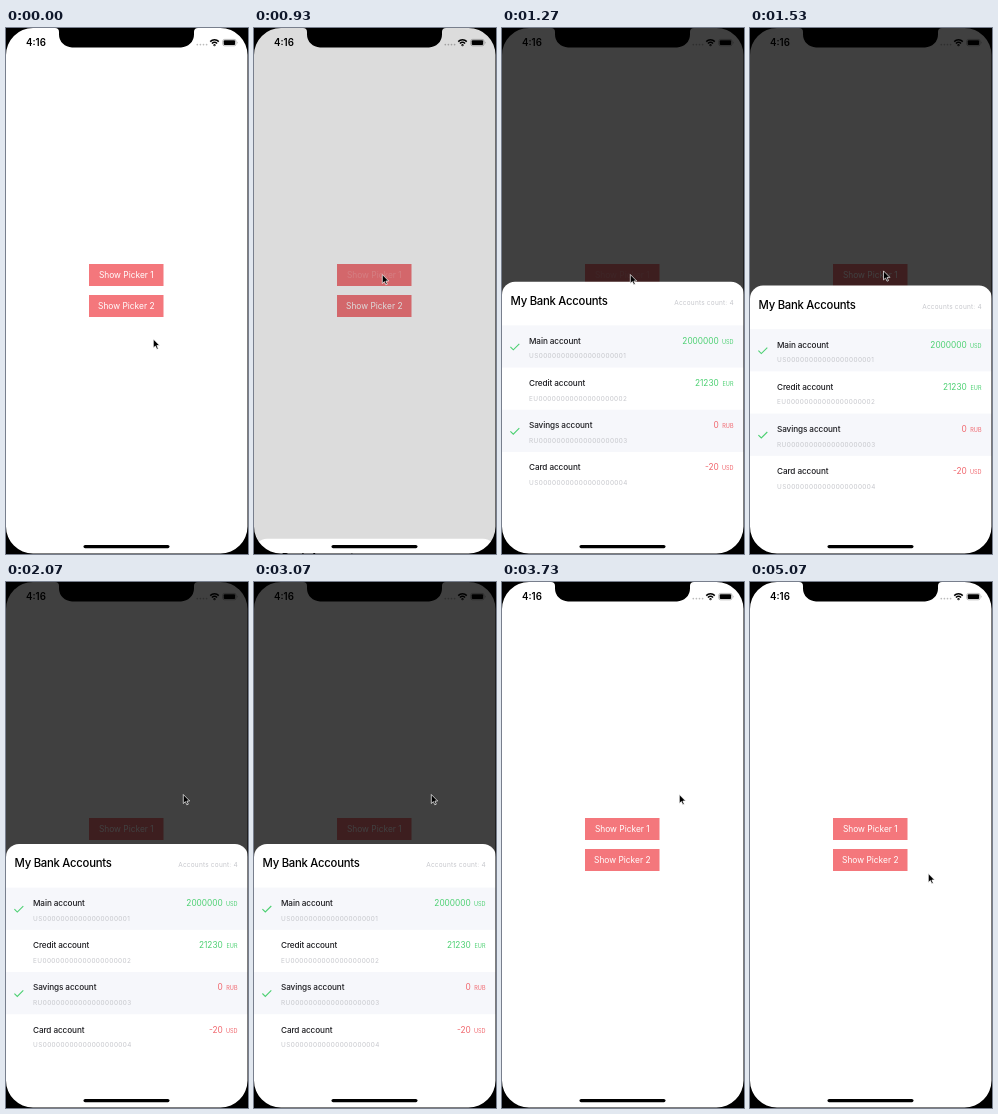
An HTML page that plays this animation: 242x526 px, repeating every 5.19 s.

```html
<!DOCTYPE html>
<html lang="en">
<head>
<meta charset="utf-8">
<title>Bottom sheet picker</title>
<style>
  html, body { margin: 0; height: 100%; overflow: hidden; background: #000; }
  svg { display: block; width: 100vw; height: 100vh; font-family: Inter, Roboto, sans-serif; }
  .button { fill: #f4777c; }
  .label { fill: #fff; font-size: 8.4px; text-anchor: middle; }
  .title { font-size: 11.3px; font-weight: 500; letter-spacing: -.25px; }
  .name { font-size: 8.2px; font-weight: 500; letter-spacing: -.1px; fill: #1c1c20; }
  .faint { fill: #c6c7cc; }
  .count { font-size: 6.5px; letter-spacing: .2px; }
  .iban { font-size: 6.4px; letter-spacing: .42px; }
  .amount { font-size: 8.3px; }
  .currency { font-size: 5.5px; }
  .end { text-anchor: end; }
</style>
</head>
<body>
<svg viewBox="0 0 242 526">
  <rect width="242" height="526" fill="#fff"/>
  <g id="buttons"></g>

  <g id="status">
    <text x="20" y="18" font-size="9.7" font-weight="600">4:16</text>
    <path d="M191.3 16.6h10" stroke="#bbb" stroke-width="1.7" stroke-linecap="round" stroke-dasharray="0 3.1"/>
    <g fill="none" stroke="#000" stroke-width="1.5">
      <path d="M204.2 13.6a6.2 6.2 0 0 1 8.6 0M205.9 15.5a3.8 3.8 0 0 1 5.2 0"/>
      <circle cx="208.5" cy="17.2" r=".4"/>
    </g>
    <rect x="216.8" y="11.4" width="13.2" height="6.4" rx="1.8" fill="none" stroke="#888" stroke-width=".6"/>
    <rect x="217.7" y="12.3" width="11.4" height="4.6" rx="1"/>
    <path d="M231 13.4q1 1.2 0 2.4z" fill="#888"/>
  </g>

  <rect id="dim" width="242" height="526"/>
  <g id="sheet">
    <rect width="242" height="400" rx="13" fill="#fff"/>
    <text class="title" x="8.5" y="23.2">My Bank Accounts</text>
    <text class="faint count end" x="231.8" y="23">Accounts count: 4</text>
    <g id="rows"></g>
  </g>

  <rect x="77.5" y="517" width="86" height="3.2" rx="1.6"/>
  <path fill-rule="evenodd" d="M0 0H242V526H0ZM27 0H214.5A27 27 0 0 1 241.5 27V498.5A27 27 0 0 1 214.5 525.5H27A27 27 0 0 1 0 498.5V27A27 27 0 0 1 27 0Z"/>
  <path d="M49 0Q53 0 53 4V6.4A13 13 0 0 0 66 19.4H175A13 13 0 0 0 188 6.4V4Q188 0 192 0Z"/>
  <path id="cursor" d="M0 0V9l2.1-1.9 1.4 3.2 1.5-.6-1.4-3.2h2.8z" stroke="#fff" stroke-width=".7"/>
</svg>

<script>
const $ = id => document.getElementById(id);
const LOOP = 5190, FRAME = 1000 / 15;
const REST = 262, TRAVEL = 264, DIM = 0.75;
const GREEN = '#4bd071', RED = '#f0646b';

$('buttons').innerHTML = [1, 2].map(n => {
  const y = 205 + 31 * n;
  return `<rect class="button" x="83" y="${y}" width="74.5" height="22"/>
    <text class="label" id="label${n}" x="120.3" y="${y + 14}">Show Picker ${n}</text>`;
}).join('');

const accounts = [
  ['Main', 'US', '2000000', 'USD', GREEN, true],
  ['Credit', 'EU', '21230', 'EUR', GREEN, false],
  ['Savings', 'RU', '0', 'RUB', RED, true],
  ['Card', 'US', '-20', 'USD', RED, false],
];
$('rows').innerHTML = accounts.map(([name, country, amount, currency, color, checked], i) => `
  <g transform="translate(0 ${43.6 + 42.2 * i})">
    ${checked ? `<rect width="242" height="42.2" fill="#f6f7fb"/>
      <path d="M8.4 21.5l2.9 2.9 6-6" fill="none" stroke="${GREEN}" stroke-width="1.1"/>` : ''}
    <text class="name" x="27" y="18.4">${name} account</text>
    <text class="faint iban" x="27" y="33">${country}${String(i + 1).padStart(20, '0')}</text>
    <g class="end" fill="${color}">
      <text class="amount" x="216.8" y="18.4">${amount}</text>
      <text class="currency" x="231.5" y="18.4">${currency}</text>
    </g>
  </g>`).join('');

const progress = (t, from, to) => Math.min(1, Math.max(0, (t - from) / (to - from)));
const smooth = p => p * p * (3 - 2 * p);

// Underdamped spring going from 1 to 0
function spring(ms) {
  const s = Math.max(0, ms) / 1000, w = 7, damping = 6.65;
  return Math.exp(-damping * s) * (Math.cos(w * s) + damping / w * Math.sin(w * s));
}

// start, end, dx, dy, sideways bulge
const moves = [
  [0, 480, -19, -64.5, 0],
  [1400, 2060, 49, -34, 0],
  [3870, 4530, 1, 79, 8],
];
function cursorAt(t) {
  let x = 147.3, y = 311;
  for (const [from, to, dx, dy, bulge] of moves) {
    const p = smooth(progress(t, from, to));
    x += dx * p + bulge * 4 * p * (1 - p);
    y += dy * p;
  }
  return [x, y];
}

function draw(t) {
  const gone = progress(t, 3552, 3730);
  const top = REST + TRAVEL * (spring(t - 895) + gone);
  $('sheet').setAttribute('transform', `translate(0 ${top})`);
  $('sheet').setAttribute('opacity', 1 - gone);
  $('dim').setAttribute('opacity', DIM * progress(t, 870, 1220) * (1 - gone));
  $('label1').setAttribute('opacity', t < 799 ? 1 : 0.2 + 0.8 * progress(t, 1270, 1530));
  $('cursor').setAttribute('transform', `translate(${cursorAt(t)})`);
}

function tick() {
  const t = performance.now() % LOOP;
  draw(Math.floor((t + 4) / FRAME) * FRAME);
  requestAnimationFrame(tick);
}
tick();
</script>
</body>
</html>
```
